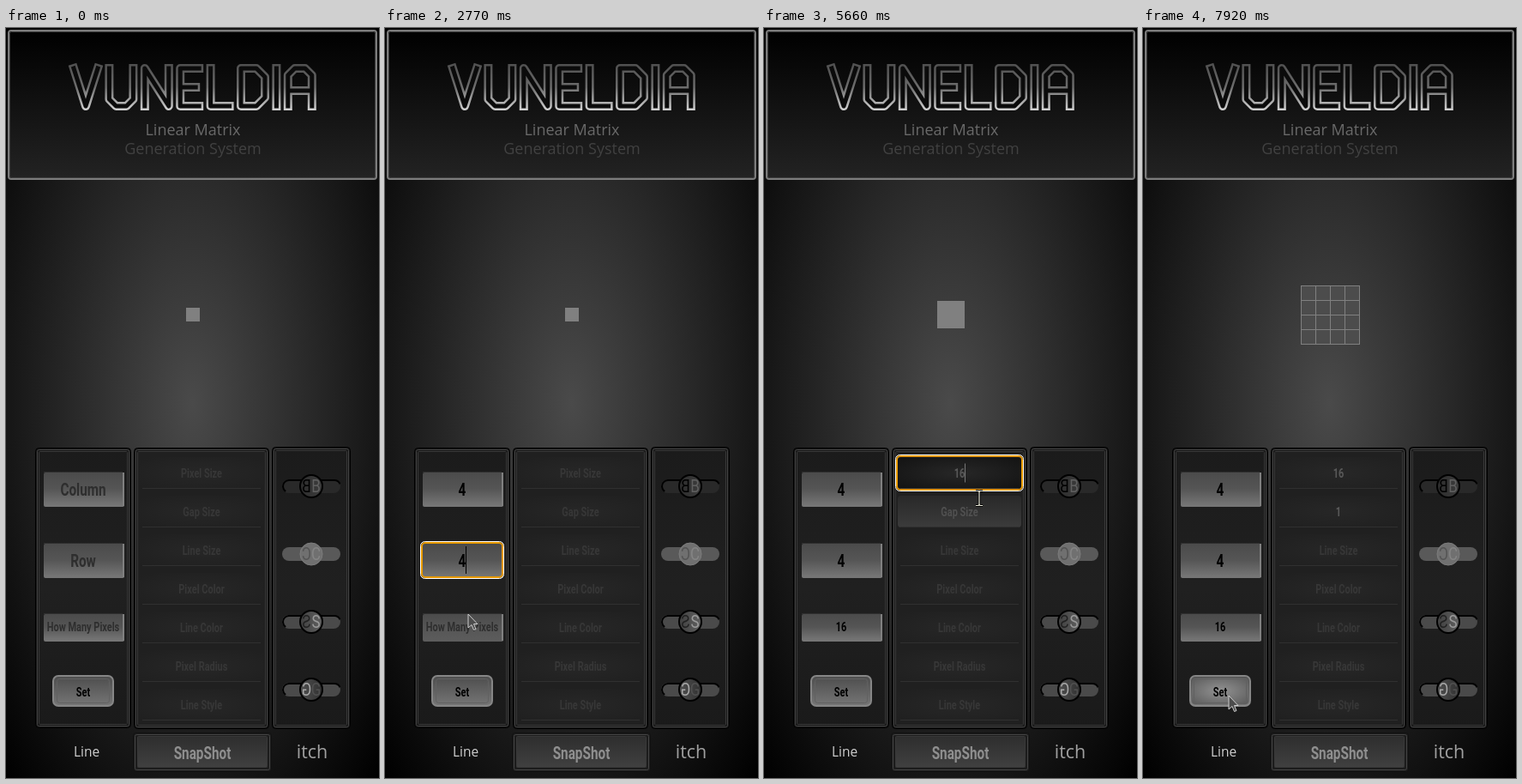
Write an HTML page with a canvas that moves like this. It is 435x874 px and loops after 8000 ms.

```html
<!DOCTYPE html>
<html lang="en">
<head>
<meta charset="utf-8">
<title>Vuneldia</title>
<style>
html, body { margin: 0; width: 100%; height: 100%; overflow: hidden; background: #000; }
canvas { display: block; }
</style>
</head>
<body>
<canvas id="stage" width="435" height="874"></canvas>
<script>
const ctx = document.getElementById('stage').getContext('2d');
const LOOP = 8000;
const CONDENSED = 0.73; // one narrow cut of Roboto for all controls

// Title letters: width and centre line on a 44 px cap height
const TITLE = [
  [28, 'M0 0L14 44L28 0'],
  [28, 'M0 0V36L8 44H20L28 36V0'],
  [28, 'M0 44V0L28 44V0'],
  [22, 'M22 0H0V44H22M0 22H18'],
  [22, 'M0 0V44H22'],
  [28, 'M0 0H18L28 10V34L18 44H0Z'],
  [0, 'M0 0V44'],
  [28, 'M0 44V8L8 0H20L28 8V44M0 26H28']
].map(([w, d]) => [w, new Path2D(d)]);
const ARROW = new Path2D('M0 0V16L4 12.5L6.5 18.5L9 17.5L6.5 11.5H11Z');
const BEAM = new Path2D('M-4 -8.5H-1L0 -7.5L1 -8.5H4M0 -7.5V7.5M-4 8.5H-1L0 7.5L1 8.5H4');

// Fields: position, size, font size, label, typed values by time
const FIELDS = [
  { x: 44, y: 518, w: 92, h: 38, size: 21, label: 'Column', typed: [[1760, '4']] },
  { x: 44, y: 601, w: 92, h: 38, size: 21, label: 'Row', typed: [[2510, '4']] },
  { x: 44, y: 683, w: 92, h: 30, size: 15, label: 'How Many Pixels', typed: [[3280, '1'], [3650, '16']] },
  ...['Pixel Size', 'Gap Size', 'Line Size', 'Pixel Color', 'Line Color', 'Pixel Radius', 'Line Style']
    .map((label, i) => ({ x: 156, y: 500 + 45 * i, w: 144, h: 37, size: 15, label, dark: true, typed: [] }))
];
FIELDS[3].typed = [[5290, '1'], [5540, '16']];
FIELDS[4].typed = [[6290, '4'], [7920, '1']];
const SET = { x: 54, y: 754, w: 72, h: 37 };

const FOCUS = [[1120, 0], [2260, 1], [3030, 2], [4170, 3], [5910, 4], [7800, -1]];
const CARET = [[0, 1], [4660, 0], [5290, 1], [6790, 0], [7040, 1]];
const SQUARE = [[0, 16], [5290, 2], [5540, 32], [7920, 0]];
// Pointer: time, x, y, shape
const POINTER = [
  [370, 360, 848, 'arrow'], [500, 295, 772, 'beam'], [620, 226, 700, 'beam'], [750, 150, 622, 'arrow'],
  [870, 112, 579, 'arrow'], [1000, 109, 550, 'beam'], [1120, 109, 550, 'click'], [1260, 109, 550, 'fade'],
  [1380, 109, 550, 'beam'], [1760, 109, 550, 'none'], [1890, 106, 572, 'arrow'], [2010, 102, 598, 'arrow'],
  [2140, 99, 622, 'beam'], [2260, 99, 622, 'click'], [2390, 99, 622, 'beam'], [2510, 99, 622, 'none'],
  [2640, 98, 652, 'arrow'], [2770, 97, 683, 'dim'], [2890, 97, 700, 'beam'], [3030, 97, 700, 'beam'],
  [3280, 97, 700, 'none'], [3780, 130, 665, 'beam'], [3910, 180, 590, 'beam'], [4030, 230, 522, 'beam'],
  [4170, 230, 522, 'click'], [4280, 230, 522, 'beam'], [5290, 230, 522, 'none'], [5660, 251, 548, 'beam'],
  [5790, 251, 560, 'beam'], [5910, 251, 560, 'click'], [6040, 251, 560, 'beam'], [6290, 251, 560, 'none'],
  [6420, 251, 560, 'beam'], [6920, 250, 566, 'beam'], [7290, 172, 690, 'arrow'], [7420, 105, 785, 'arrow'],
  [7540, 101, 786, 'arrow'], [7660, 100, 778, 'arrow'], [7800, 100, 778, 'press'], [7920, 100, 778, 'dim']
];

const latest = (list, t) => list.filter(e => e[0] <= t).pop();
const step = (list, t, start) => (latest(list, t) || [0, start])[1];
const inside = (p, r) => p && p[1] >= r.x && p[1] <= r.x + r.w && p[2] >= r.y && p[2] <= r.y + r.h;

function linear(x0, y0, x1, y1, colors) {
  const g = ctx.createLinearGradient(x0, y0, x1, y1);
  colors.forEach((c, i) => g.addColorStop(i / (colors.length - 1), c));
  return g;
}
const vertical = (y, h, ...colors) => linear(0, y, 0, y + h, colors);
const horizontal = (x, w, ...colors) => linear(x, 0, x + w, 0, colors);

function box(x, y, w, h, r, fill, stroke, line = 1) {
  ctx.beginPath();
  ctx.roundRect(x, y, w, h, r);
  if (fill) { ctx.fillStyle = fill; ctx.fill(); }
  if (stroke) { ctx.strokeStyle = stroke; ctx.lineWidth = line; ctx.stroke(); }
}

// Elliptic glow filling a rounded box
function glow(x, y, w, h, r, inner, outer, reach) {
  ctx.save();
  ctx.beginPath();
  ctx.roundRect(x, y, w, h, r);
  ctx.clip();
  ctx.translate(x + w / 2, y + h / 2);
  ctx.scale(w / 2, h / 2);
  const g = ctx.createRadialGradient(0, 0, 0, 0, 0, reach);
  g.addColorStop(0, inner);
  g.addColorStop(1, outer);
  ctx.fillStyle = g;
  ctx.fillRect(-1, -1, 2, 2);
  ctx.restore();
}

function text(str, x, y, font, color, scale = 1) {
  ctx.save();
  ctx.translate(x, y);
  ctx.scale(scale, 1);
  ctx.font = font;
  ctx.textAlign = 'center';
  ctx.fillStyle = color;
  ctx.fillText(str, 0, 0);
  const width = ctx.measureText(str).width * Math.abs(scale);
  ctx.restore();
  return width;
}

const narrow = (str, x, mid, size, color, weight = 600) =>
  text(str, x, mid + size * 0.36, `${weight} ${size}px Roboto, sans-serif`, color, CONDENSED);
const plain = (str, x, base, size, color) =>
  text(str, x, base, `${size}px "Open Sans", sans-serif`, color);

function header() {
  box(3, 3, 429, 173, 3, vertical(3, 174, '#000', '#232323'), '#7c7c7c', 2);
  box(4.5, 4.5, 426, 170, 2, null, '#404040');
  ctx.lineCap = 'square';
  ctx.lineJoin = 'round';
  let x = 79;
  for (const [w, path] of TITLE) {
    ctx.save();
    ctx.translate(x, 47);
    ctx.lineWidth = 10;
    ctx.strokeStyle = vertical(-5, 54, '#505050', '#6c6c6c', '#d2d2d2');
    ctx.stroke(path);
    ctx.lineWidth = 5;
    ctx.strokeStyle = '#0b0b0b';
    ctx.stroke(path);
    ctx.restore();
    x += w + 13.4;
  }
  ctx.lineCap = 'butt';
  plain('Linear Matrix', 218, 125, 18, '#696969');
  plain('Generation System', 218, 147, 18, '#414141');
}

function panel(x, y, w, h, fill) {
  box(x + 0.5, y + 0.5, w - 1, h - 1, 4, '#161616', '#000');
  box(x + 2.5, y + 2.5, w - 5, h - 5, 2, null, '#444');
  box(x + 4.5, y + 4.5, w - 9, h - 9, 1, fill, '#393939');
}

function field(f, t, focused, hover) {
  const { x, y, w, h } = f, mid = y + h / 2, value = step(f.typed, t, '');
  if (f.dark) {
    if (hover && !focused) box(x, y, w, h, 4, vertical(y, h, '#292929', '#3b3b3b'));
    else glow(x, y, w, h, 4, '#272727', focused ? '#141414' : '#202020', 1.3);
    ctx.fillStyle = '#303030';
    ctx.fillRect(x + 3, y + h - 1, w - 6, 1);
  } else {
    const foot = hover && !focused ? '#5c5c5c' : '#757575';
    box(x, y, w + 2, h + 2, 2, vertical(y, h, '#4b4b4b', '#555', foot));
    ctx.fillStyle = '#303030';
    ctx.fillRect(x, y - 1, w, 1);
    ctx.fillStyle = '#808080';
    ctx.fillRect(x + w, y, 2, h + 1);
  }
  const hint = f.dark ? (hover ? '#505050' : '#373737') : '#2e2e2e';
  const ink = f.dark ? '#595959' : '#000';
  const width = narrow(value || f.label, x + w / 2, mid, f.size, value ? ink : hint);
  if (!focused) return;
  if (step(CARET, t)) {
    const tall = f.size === 21 ? 32 : 22;
    ctx.fillStyle = f.dark ? '#777' : '#000';
    ctx.fillRect(Math.round(x + w / 2 + (value ? width / 2 : 0)), mid - tall / 2, 1, tall);
  }
  box(x - 1, y - 1, w + 2, h + 2, 4, null, '#e59700', 2);
  box(x - 2.5, y - 2.5, w + 5, h + 5, 5, null, '#fff');
}

function setButton(hover) {
  const { x, y, w, h } = SET;
  box(x + 1, y + 1, w - 2, h - 2, 6, vertical(y, h, '#4c4c4c', '#777'), '#868686', 2);
  if (hover) glow(x + 3, y + 3, w - 6, h - 6, 4, '#929292', '#5e5e5e', 1.3);
  box(x + 5.5, y + 4.5, w - 11, h - 9, 3, null, '#616161');
  narrow('Set', 90, y + 20, 15, '#000', 700);
}

function toggle(y, letter, track, knob, left, right, ring) {
  const x = 356;
  box(322, y - 8, 68, 16, 8, track);
  if (ring) {
    ctx.strokeStyle = '#000';
    ctx.lineWidth = 2;
    ctx.beginPath();
    ctx.moveTo(326, y + 6);
    ctx.arc(330, y, 7, 2.3, 4.7);
    ctx.lineTo(383, y - 7);
    ctx.arc(383, y, 7, -1.57, -0.4);
    ctx.stroke();
  }
  ctx.beginPath();
  ctx.arc(x, y, 13, 0, 7);
  ctx.fillStyle = horizontal(x - 13, 26, ...knob);
  ctx.fill();
  ctx.strokeStyle = ring ? '#000' : '#7c7c7c';
  ctx.lineWidth = ring ? 2 : 1;
  ctx.stroke();
  const font = '20px Roboto, sans-serif';
  text(letter, x - 5.5, y + 7, font, left, -0.85);
  text(letter, x + 5.5, y + 7, font, right, 0.85);
}

function controls(t, p) {
  const side = vertical(489, 327, '#1b1b1b', '#202020', '#1a1a1a');
  panel(34, 489, 112, 327, side);
  panel(149, 489, 158, 328, '#202020');
  panel(310, 488, 92, 329, side);
  const focus = step(FOCUS, t, -1);
  FIELDS.forEach((f, i) => field(f, t, i === focus, inside(p, f)));
  setButton(inside(p, SET));

  toggle(534, 'B', '#292929', ['#2c2c2c', '#3c3c3c'], '#000', '#606060', true);
  toggle(613, 'C', '#595959', ['#707070', '#707070'], '#555', '#858585', false);
  toggle(692, 'S', '#4a4a4a', ['#404040', '#606060'], '#222', '#9a9a9a', true);
  toggle(771, 'G', '#4a4a4a', ['#505050', '#303030'], '#a8a8a8', '#505050', true);

  box(148.5, 821.5, 161, 45, 3, '#1c1c1c', '#111');
  box(150.5, 823.5, 157, 41, 2, null, '#444');
  box(153.5, 825.5, 151, 36, 1, vertical(825, 36, '#2e2e2e', '#404040'), '#383838');
  narrow('SnapShot', 229, 844, 21, '#8f8f8f', 700);
  plain('Line', 94, 849, 15.5, '#d0d0d0');
  plain('itch', 357, 851, 21.5, '#a0a0a0');
}

function matrix(t) {
  const side = step(SQUARE, t);
  ctx.fillStyle = '#808080';
  if (side) return ctx.fillRect(218 - side / 2, 334 - side / 2, side, side);
  ctx.fillRect(184, 300, 69, 69);
  ctx.fillStyle = '#4c4c4c';
  for (let i = 0; i < 16; i++) ctx.fillRect(185 + 17 * (i % 4), 301 + 17 * (i >> 2), 16, 16);
}

function pointer(p) {
  if (!p || p[3] === 'none') return;
  const [, x, y, shape] = p;
  ctx.save();
  ctx.translate(x, y);
  if (['click', 'fade', 'press'].includes(shape)) {
    ctx.beginPath();
    ctx.arc(0, 0, 12, 0, 7);
    ctx.fillStyle = `rgba(185, 175, 10, ${shape === 'fade' ? 0.35 : 0.8})`;
    ctx.fill();
  }
  if (['arrow', 'dim', 'press'].includes(shape)) {
    const dim = shape === 'dim';
    ctx.fillStyle = dim ? '#4c4c4c' : '#fff';
    ctx.strokeStyle = dim ? '#ccc' : '#000';
    ctx.lineWidth = 1;
    ctx.fill(ARROW);
    ctx.stroke(ARROW);
  } else {
    ctx.strokeStyle = '#000';
    ctx.lineWidth = 3;
    ctx.stroke(BEAM);
    ctx.strokeStyle = '#e8e8d8';
    ctx.lineWidth = 1.2;
    ctx.stroke(BEAM);
  }
  ctx.restore();
}

function draw(now) {
  const t = now % LOOP, p = latest(POINTER, t);
  glow(0, 0, 435, 874, 0, '#4a4a4a', '#000', Math.SQRT2);
  header();
  matrix(t);
  controls(t, p);
  pointer(p);
}

const start = performance.now();
function tick() {
  draw(performance.now() - start);
  requestAnimationFrame(tick);
}
tick();
</script>
</body>
</html>
```
